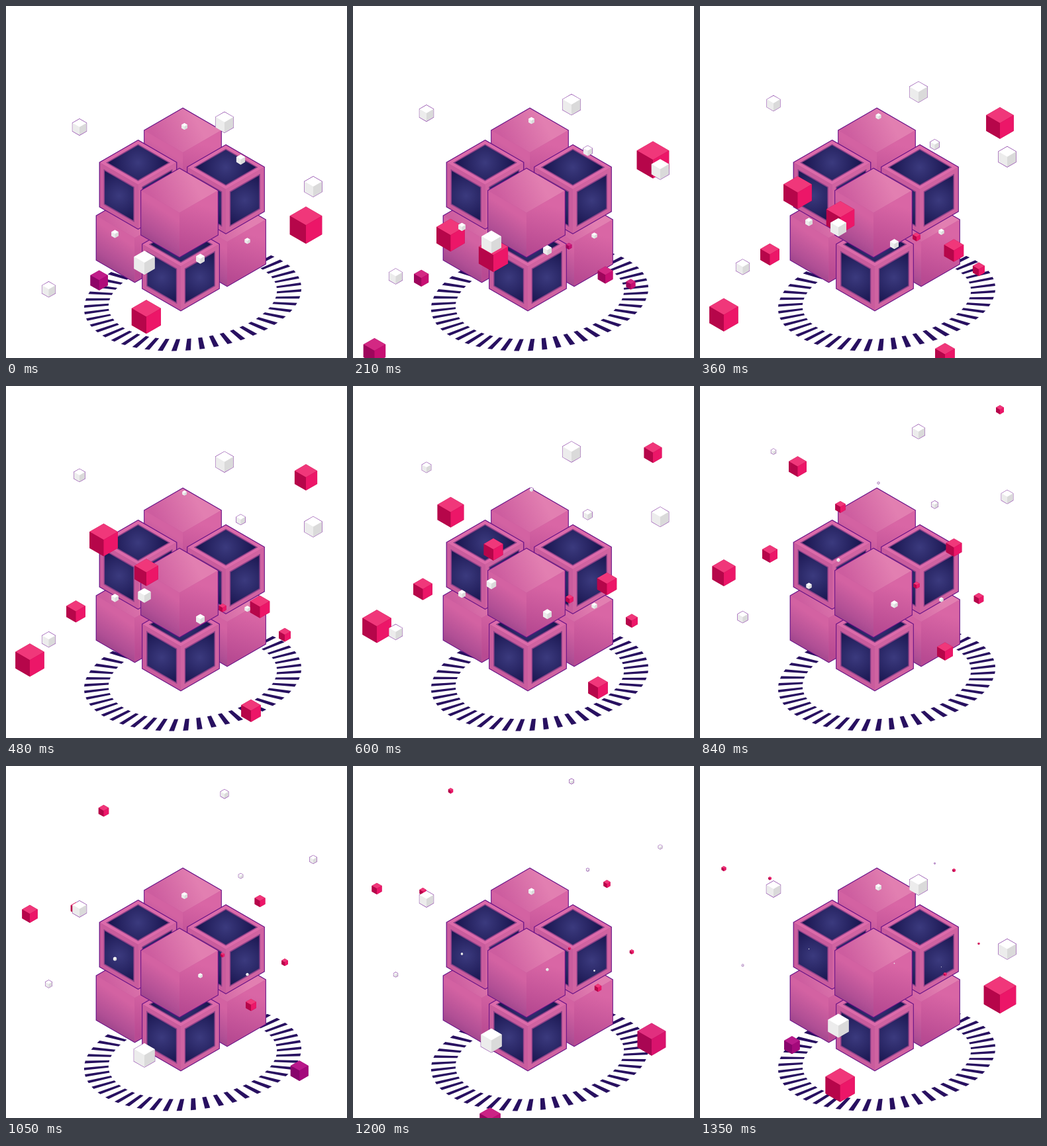
An HTML page with a canvas that plays this animation: 515x532 px, repeating every 1380 ms.

```html
<!DOCTYPE html>
<html lang="en">
<head>
<meta charset="utf-8">
<title>Cube cluster</title>
<style>
  html, body { margin: 0; width: 100%; height: 100%; overflow: hidden; background: #fff; }
  canvas { display: block; }
</style>
</head>
<body>
<canvas id="stage" width="515" height="532"></canvas>
<script>
const ctx = document.getElementById('stage').getContext('2d');
const LOOP = 1380, STEP = 30, COS30 = Math.sqrt(3) / 2, BIG = 66.5;

const RING = { x: 282, y: 442, a: 165, b: 77.5, tilt: -0.12, inner: 0.775, count: 48, duty: 0.37, pitches: 11 };

// Each cube starts at x, y; nearer cubes are larger and rise farther in proportion.
const cube = (x, y, r, birth) => ({ x, y, r, birth });
const WHITE = [
  cube(111, 216.5, 12.1, 1045), cube(330, 181.5, 15.4, 1335), cube(464, 282.5, 15.2, 1305),
  cube(354.5, 233, 7.6, 1365), cube(269.5, 198, 5.1, 1000), cube(64.5, 428.3, 11.4, 0),
  cube(164.5, 344.5, 6.1, 0), cube(364.5, 355, 4.6, 0), cube(293.5, 382, 7.5, 0), cube(209, 458.6, 18, 905),
];
const RED = [
  cube(453, 478, 28, 980), cube(147.5, 437, 24.6, 1280), cube(212, 568, 25.5, 1060),
  cube(36, 563, 25, 40), cube(105.5, 439, 16.5, 40), cube(383.5, 435, 17, 40),
  cube(421, 438, 10.4, 40), cube(327, 374, 6.5, 40), cube(370, 592, 17, 40),
];
const WHITE_RISE = 11.4, RED_RISE = 16.8, RED_LIFE = 0.96;

const mix = (from, to, k) => `rgb(${from.map((c, i) => Math.round(c + (to[i] - c) * k))})`;
const age = (t, birth) => ((t - birth + LOOP) % LOOP) / LOOP;
const shrink = p => Math.min(1, 1.75 * (1.04 - p));

// Slow start, quick middle, soft end
const surge = p => [0.072, -0.035, -0.016, -0.0115]
  .reduce((sum, c, i) => sum + c * Math.sin((i + 1) * Math.PI * p), p);

function trace(points) {
  ctx.beginPath();
  points.forEach(([x, y]) => ctx.lineTo(x, y));
  ctx.closePath();
}

function fill(points, paint) {
  trace(points);
  ctx.fillStyle = paint;
  ctx.fill();
}

function outline(points, color, width) {
  trace(points);
  ctx.strokeStyle = color;
  ctx.lineWidth = width;
  ctx.stroke();
}

function hexagon(x, y, r) {
  const w = r * COS30, h = r / 2;
  return [[x, y - r], [x + w, y - h], [x + w, y + h], [x, y + r], [x - w, y + h], [x - w, y - h]];
}

function faces(x, y, r) {
  const [n, ne, se, s, sw, nw] = hexagon(x, y, r), c = [x, y];
  return [[nw, n, ne, c], [nw, c, s, sw], [c, ne, se, s]];
}

function smallCube(x, y, r, colors) {
  fill(hexagon(x, y, r), colors[1]);
  faces(x, y, r).forEach((face, i) => fill(face, colors[i]));
}

function linear(from, to, ...colors) {
  const g = ctx.createLinearGradient(...from, ...to);
  colors.forEach((c, i) => g.addColorStop(i / (colors.length - 1), c));
  return g;
}

function pinkCube(x, y) {
  const [top, left, right] = faces(x, y, BIG);
  fill(hexagon(x, y, BIG), '#c4559a');
  fill(top, linear([x - 40, y - 20], [x + 20, y - 50], '#cd5d9f', '#e27fb1'));
  fill(left, linear([x - 5, y + 10], [x - 45, y + 70], '#d362a2', '#b14f95', '#7f367c'));
  fill(right, linear([x + 40, y - 10], [x + 20, y + 60], '#d966a5', '#b84a92'));
}

const center = face => [0, 1].map(axis => (face[0][axis] + face[2][axis]) / 2);

function glassCube(x, y) {
  fill(hexagon(x, y, BIG), '#b9508f');
  faces(x, y, BIG).forEach((face, i) => {
    const [cx, cy] = center(face), k = i ? 0.75 : 0.79;
    const pane = face.map(([px, py]) => [cx + (px - cx) * k, cy + (py - cy) * k]);
    const glow = ctx.createRadialGradient(cx, cy, 0, cx, cy, 44);
    glow.addColorStop(0, '#3b3a7e');
    glow.addColorStop(1, '#19154f');
    fill(face, ['#dc6baa', '#c95c9d', '#d063a1'][i]);
    outline(pane, '#8c4088', 3);
    fill(pane, glow);
  });
}

function drawRing(t) {
  const { x, y, a, b, tilt, inner, count, duty, pitches } = RING, pitch = 2 * Math.PI / count;
  ctx.save();
  ctx.translate(x, y);
  ctx.rotate(tilt);
  const spot = (angle, k) => [a * k * Math.cos(angle), b * k * Math.sin(angle)];
  for (let i = 0; i < count; i++) {
    const from = 1.67 + pitch * (i - duty / 2 - pitches * t / LOOP), to = from + pitch * duty;
    fill([spot(from, inner), spot(from, 1), spot(to, 1), spot(to, inner)], '#281060');
  }
  ctx.restore();
}

function drawRed(t, { x, y, r, birth }) {
  const p = age(t, birth), young = Math.max(0, 1 - p / 0.25), k = Math.min(1, p / 0.2);
  if (p > RED_LIFE) return;
  const colors = [
    mix([165, 15, 145], [240, 55, 122], k),
    mix([120, 5, 120], [182, 6, 74], k),
    mix([140, 5, 130], [236, 22, 104], k),
  ];
  const size = r * Math.min(0.4 + 3 * p, shrink(p));
  smallCube(x - 0.55 * r * young * young, y - RED_RISE * r * surge(p), size, colors);
}

function drawCluster() {
  const place = (paint, x, apex) => {
    outline(hexagon(x, apex + BIG, BIG), '#6a1488', 2.6);
    paint(x, apex + BIG);
  };
  place(pinkCube, 267, 155);
  place(pinkCube, 194.5, 284);
  place(pinkCube, 334, 290);
  place(glassCube, 199.5, 203.5);
  place(glassCube, 332, 210.5);
  place(glassCube, 264, 327);
  place(pinkCube, 262, 246);
}

function draw(t) {
  ctx.fillStyle = '#fff';
  ctx.fillRect(0, 0, 515, 532);
  drawRing(t);
  const whites = WHITE.map(({ x, y, r, birth }) => {
    const p = age(t, birth);
    return [x, y - WHITE_RISE * r * p, r * shrink(p)];
  });
  // Purple rims lie behind the cluster, so they show only against the backdrop.
  whites.forEach(w => outline(hexagon(...w), '#8b3fa8', 1.4));
  drawCluster();
  RED.forEach(red => drawRed(t, red));
  whites.forEach(w => smallCube(...w, ['#ffffff', '#ececec', '#dadada']));
}

function tick() {
  draw(Math.floor(performance.now() % LOOP / STEP) * STEP);
  requestAnimationFrame(tick);
}
tick();
</script>
</body>
</html>
```
